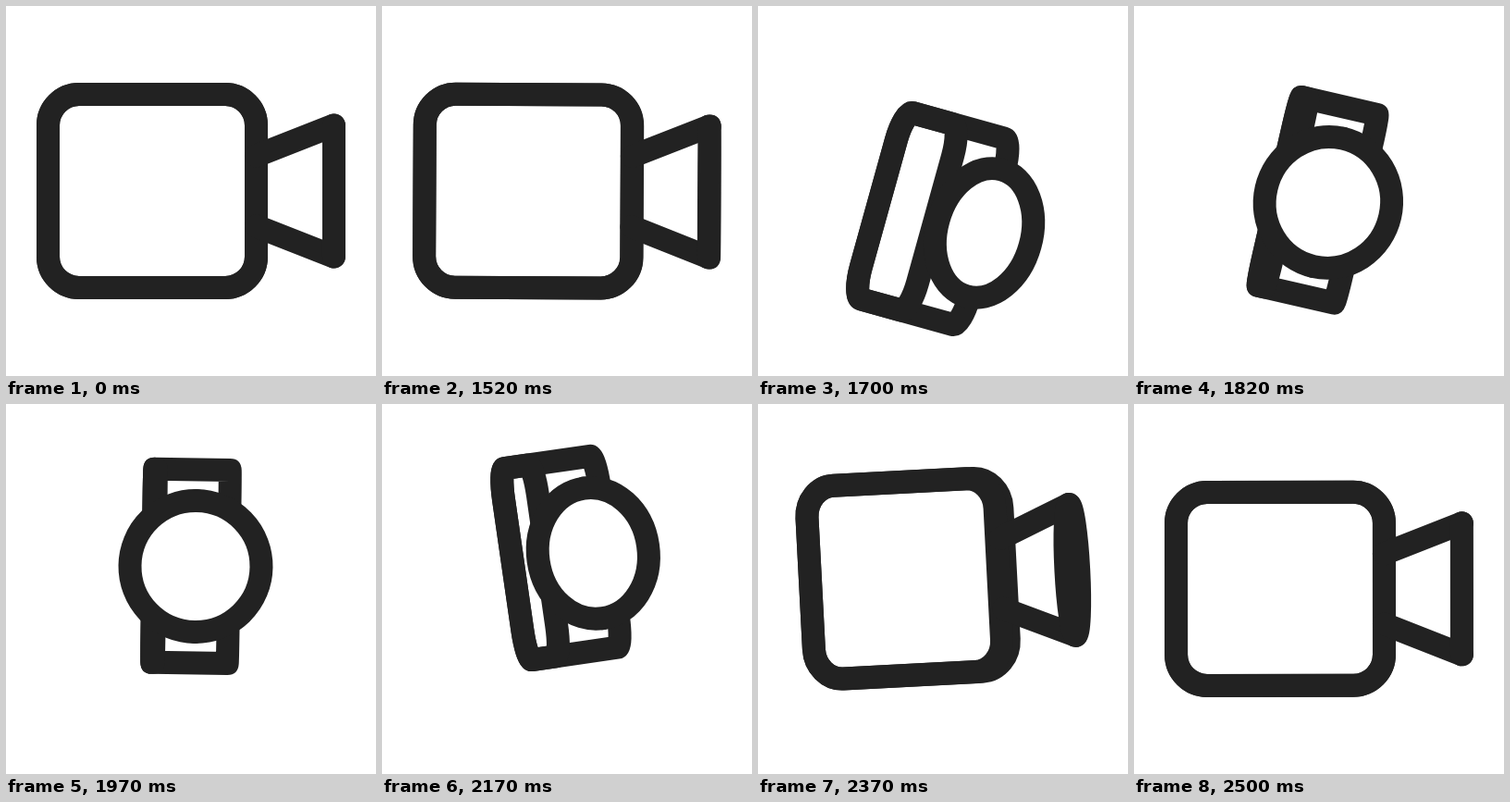
Recreate the animation shown at these times as an HTML page with a canvas. Size 400 by 400 pixels, loop 2520 ms.

```html
<!DOCTYPE html>
<html lang="en">
<head>
<meta charset="utf-8">
<title>Video camera icon</title>
<style>
html, body { margin: 0; width: 100%; height: 100%; overflow: hidden; background: #fff; }
canvas { display: block; }
</style>
</head>
<body>
<canvas width="400" height="400"></canvas>
<script>
const ctx = document.querySelector('canvas').getContext('2d');
const LOOP = 2520, START = 1520, STEP = 25;

const smooth = p => p * p * (3 - 2 * p);

// cubic-bezier(.25, 0, .3, 1), solved by bisection
function glide(p) {
  let lo = 0, hi = 1;
  for (let i = 0; i < 24; i++) {
    const k = (lo + hi) / 2, r = 1 - k;
    if (.75 * k * r * r + .9 * k * k * r + k ** 3 < p) lo = k; else hi = k;
  }
  return smooth(lo);
}

// keys: [time, value, easing towards this key]
function track(t, keys) {
  if (t <= keys[0][0]) return keys[0][1];
  for (let i = 1; i < keys.length; i++) {
    const [t0, v0] = keys[i - 1], [t1, v1, ease = smooth] = keys[i];
    if (t < t1) return v0 + (v1 - v0) * ease((t - t0) / (t1 - t0));
  }
  return keys[keys.length - 1][1];
}

const turnKeys = [[1511, 0], [1905, 1, glide], [2106, 1], [2508, 0, glide]];
const tiltKeys = [[1512, 0], [1640, 15.5], [1740, 15.5], [2140, -8.2], [2175, -8.2], [2508, 0]];
const liftKeys = [[1512, 0], [1710, 33.5], [2150, -34.5, glide], [2186, -34.5], [2508, 0]];

function box(x, w, rx) {
  ctx.beginPath();
  ctx.roundRect(x, -104.5, w, 209, { x: rx, y: 33.5 });
  ctx.stroke();
}

// turn: 0 = side view, 1 = lens facing the viewer
function draw(turn, tilt, lift) {
  ctx.setTransform(1, 0, 0, 1, 0, 0);
  ctx.fillStyle = '#fff';
  ctx.fillRect(0, 0, 400, 400);
  ctx.translate(200, 200 + lift);
  ctx.rotate(tilt * Math.PI / 180);
  ctx.strokeStyle = '#222';
  ctx.lineWidth = 25;
  ctx.lineCap = ctx.lineJoin = 'round';

  const face = 225 - 223 * turn, depth = 80 * turn;
  const left = -42 * (1 - turn) - (face + depth) / 2;
  const mount = left + face + depth / 2;
  const lens = mount + 84 - 80 * turn;
  const radius = 33.5 * face / 225;

  box(left, face + depth, radius);
  box(left, face, radius);

  ctx.beginPath();
  for (const side of [-1, 1]) {
    ctx.moveTo(mount, 38 * side);
    ctx.lineTo(lens, 71 * side);
  }
  ctx.stroke();

  ctx.beginPath();
  ctx.ellipse(lens, 0, Math.max(.01, 71 * turn), 71, 0, 0, 2 * Math.PI);
  ctx.fill();
  ctx.stroke();
}

function frame() {
  const now = performance.now() % LOOP;
  const t = now < START ? 0 : START + Math.floor((now - START) / STEP) * STEP + 2;
  draw(track(t, turnKeys), track(t, tiltKeys), track(t, liftKeys));
  requestAnimationFrame(frame);
}
frame();
</script>
</body>
</html>
```
